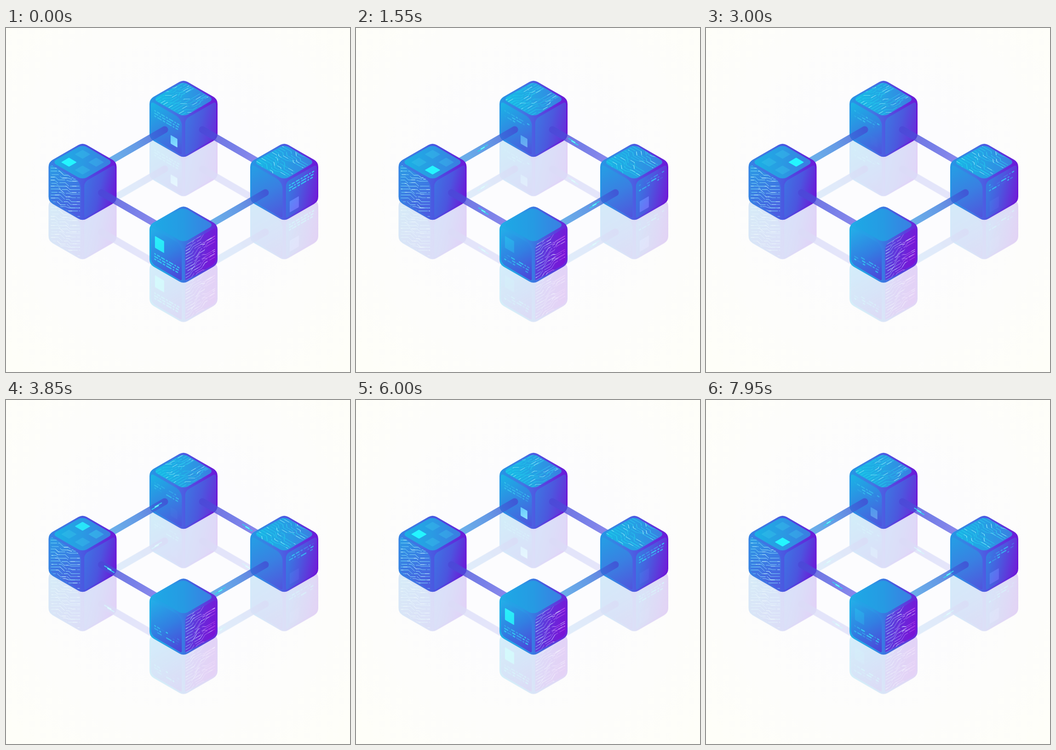
These frames come from a looping animation (748 px wide and 748 px high, 8 s). An HTML page with a canvas:

```html
<!DOCTYPE html>
<html lang="en">
<head>
<meta charset="utf-8">
<title>Linked blocks</title>
<style>
html, body { margin: 0; width: 100%; height: 100%; overflow: hidden; background: #fdfdfc; }
canvas { display: block; width: 100vw; height: 100vh; }
</style>
</head>
<body>
<canvas id="stage" width="748" height="748"></canvas>
<script>
const SIZE = 748, LOOP = 8000, CYCLE = 6260, PULSE = CYCLE / 2;
const HALF = 74, RISE = HALF / Math.sqrt(3), EDGE = RISE * 2;
const stage = document.getElementById('stage').getContext('2d');
const layer = document.createElement('canvas');
layer.width = layer.height = SIZE;
const g = layer.getContext('2d');

const noise = n => { const x = Math.sin(n * 127.1 + 3.7) * 43758.5453; return x - Math.floor(x); };
const clamp = x => Math.min(1, Math.max(0, x));

// Linear interpolation through [time, value] pairs
function keyed(t, keys) {
  for (let i = 1; i < keys.length; i++) {
    const [t0, v0] = keys[i - 1], [t1, v1] = keys[i];
    if (t <= t1) return v0 + (v1 - v0) * (t - t0) / (t1 - t0);
  }
  return keys[keys.length - 1][1];
}

function gradient(ctx, x0, y0, x1, y1, colors) {
  const fill = ctx.createLinearGradient(x0, y0, x1, y1);
  colors.forEach((c, i) => fill.addColorStop(i / (colors.length - 1), c));
  return fill;
}

// Each face maps a 100 x 100 square onto one side of the cube
const FACES = {
  top: [HALF, -RISE, HALF, RISE, -HALF, -RISE],
  left: [HALF, RISE, 0, EDGE, -HALF, -RISE],
  right: [HALF, -RISE, 0, EDGE, 0, 0]
};
const PANELS = {
  top: [5, 5, 90, 90, 13],
  left: [4, 3, 91, 92, [9, 17, 5, 13]],
  right: [5, 3, 91, 92, [10, 9, 13, 5]]
};

function onFace(name, draw) {
  const [a, b, c, d, x, y] = FACES[name];
  g.save();
  g.transform(a / 100, b / 100, c / 100, d / 100, x, y);
  draw();
  g.restore();
}

function panel(name, colors, detail) {
  onFace(name, () => {
    g.beginPath();
    g.roundRect(...PANELS[name]);
    g.fillStyle = name === 'right' ? gradient(g, 0, 30, 100, 60, colors) : gradient(g, 5, 5, 95, 95, colors);
    g.fill();
    if (detail) { g.clip(); detail(); }
  });
}

function hull(colors) {
  const pts = [[0, -EDGE], [HALF, -RISE], [HALF, RISE], [0, EDGE], [-HALF, RISE], [-HALF, -RISE]];
  g.beginPath();
  g.moveTo(HALF / 2, -EDGE + RISE / 2);
  for (let i = 1; i <= 6; i++) g.arcTo(...pts[i % 6], ...pts[(i + 1) % 6], 18);
  g.closePath();
  g.fillStyle = gradient(g, -HALF, 0, HALF, 0, colors);
  g.fill();
}

// Parallel tracks that bend together, with light running along them
function circuit(t, { flat, jog, along = 'u', colors, seed }) {
  const put = (u, v, cmd) => along === 'u' ? g[cmd](u, v) : g[cmd](v, u);
  g.lineJoin = 'round';
  for (let i = -8; i < 26; i++) {
    let u = 7 + (i % 3 === 0 ? 5 * noise(i + seed) : 0), v = i * 7.6 + 4;
    g.beginPath();
    put(u, v, 'moveTo');
    const wave = Math.sin(i * .75 + seed);
    const steps = [[20 + 9 * wave, flat], [11 + 3 * wave, jog], [17 - 6 * wave, flat],
      [9 - 2 * wave, i % 5 < 3 ? jog : -jog * .6], [40, flat]];
    for (const [du, slope] of steps) {
      const end = Math.min(92, u + du);
      v += (end - u) * slope;
      u = end;
      put(u, v, 'lineTo');
    }
    g.strokeStyle = gradient(g, 5, 0, 95, 0, colors);
    g.lineWidth = 1.25;
    g.globalAlpha = .8;
    g.setLineDash([24 + 40 * noise(i * 3 + seed), 5]);
    g.lineDashOffset = 20 * noise(i + 50);
    g.stroke();
    g.strokeStyle = '#d8fbff';
    g.globalAlpha = .6;
    g.setLineDash([13, 57]);
    g.lineDashOffset = 70 * (noise(i + seed) - t / PULSE);
    g.stroke();
  }
}

const ROWS = [[5, 9, 11, 6, 13, 5, 7], [12, 5, 10, 15, 6, 9], [6, 13, 7, 16, 5, 8]];
const TEXT_LEVEL = [[0, 1], [350, .9], [940, .3], [1550, .42], [3000, .42], [4600, .35], [6000, .72], [CYCLE, 1]];

function dashes(t, top, color, seed) {
  const level = keyed(t, TEXT_LEVEL);
  g.fillStyle = color;
  ROWS.forEach((row, r) => {
    let u = 14;
    row.forEach((w, i) => {
      const phase = noise(r * 9 + i + seed) + t / PULSE * 2;
      const swing = Math.sin(phase * Math.PI * 2) * .55 * Math.min(1, (1 - level) * 2);
      g.globalAlpha = clamp(level + swing) * .85;
      g.beginPath();
      g.roundRect(u, top + r * 6.8, w, 3.2, 1);
      g.fill();
      u += w + 3;
    });
  });
}

function square(x, y, w, h, alpha, colors) {
  g.globalAlpha = alpha;
  g.fillStyle = gradient(g, x, y, x + w, y + h, colors);
  g.beginPath();
  g.roundRect(x, y, w, h, 1.5);
  g.fill();
}

// Tile positions with the times at which each lights up and goes out
const TILES = [[30, 30, 4500, 6960], [30, 70, 700, 2250], [70, 70, 2250, 3750], [70, 30, 3750, 4650]];

function tiles(t) {
  for (const [u, v, on, off] of TILES) {
    const time = t < on - 200 ? t + CYCLE : t;
    const lit = clamp((time - on + 150) / 300) * clamp((off + 150 - time) / 300);
    g.globalAlpha = .3 + .7 * lit;
    g.fillStyle = `rgb(${60 - 24 * lit},${205 + 40 * lit},${235 + 20 * lit})`;
    g.beginPath();
    g.roundRect(u - 11.5, v - 11.5, 23, 23, 1.5);
    g.fill();
  }
}

const RIM = ['#2497e5', '#4277e4', '#5842df', '#6d16d8'];
const CYAN = ['#27dcf0', '#22cdec', '#39d8f2'];
const CUBES = {
  back: {
    x: 386, y: 197.5, rim: RIM,
    top: ['#15bfe5', '#25a2e4', '#3b7be2'],
    left: ['#18b5e5', '#3285e2', '#5052dd'],
    right: ['#3f73e1', '#4c58de', '#6530da'],
    onTop: t => circuit(t, { flat: 0, jog: .95, colors: CYAN, seed: 2 }),
    onLeft(t) {
      dashes(t, 20, '#38c6ee', 4);
      square(62, 60, 20, 22, keyed(t, [[0, 1], [350, 1], [940, 0], [1300, .85], [1550, .6], [2050, 0],
        [4500, .05], [5100, 1], [CYCLE, 1]]), ['#62c8fb', '#8fe2ff']);
    }
  },
  west: {
    x: 166.5, y: 334.5, rim: ['#3584e4', '#4270e3', '#5243df', '#6b18d8'],
    top: ['#19b3e4', '#2a9ae3', '#3d78e2'],
    left: ['#2b9ee5', '#3d78e3', '#4f57df'],
    right: ['#4070e2', '#4c55df', '#681fd8'],
    onTop: tiles,
    onLeft: t => circuit(t, { flat: -.5, jog: .32, colors: ['#6ed7f5', '#9beafa', '#72c9f7'], seed: 1 })
  },
  east: {
    x: 605, y: 334.5, rim: RIM,
    top: ['#18b8e5', '#269fe4', '#3c7ce2'],
    left: ['#249fe4', '#3980e2', '#5153dc'],
    right: ['#347fe2', '#4d55de', '#6c22d8'],
    onTop: t => circuit(t, { flat: 0, jog: -.85, along: 'v', colors: CYAN, seed: 5 }),
    onRight(t) {
      dashes(t, 15, '#32d9f5', 17);
      square(16, 58, 27, 28, keyed(t, [[0, .9], [300, 1], [1450, 1], [1800, .4], [3000, .15], [3900, .2],
        [4500, 1], [5000, 1], [5700, .15], [6000, .15], [CYCLE, .9]]), ['#5f8cfb', '#7373fa']);
    }
  },
  front: {
    x: 386, y: 471, rim: ['#1fade7', '#2999e5', '#4a59df', '#6c22da'],
    top: ['#1da9e5', '#269ae3', '#3d7ce3'],
    left: ['#22afe8', '#327fe2', '#503fd8'],
    right: ['#5351df', '#672bda', '#7b12d6'],
    onLeft(t) {
      square(16, 20, 27, 30, keyed(t, [[0, 1], [950, 1], [1550, .26], [2100, 0], [3900, 0], [4600, .8],
        [5000, 1], [CYCLE, 1]]), ['#2cf0fa', '#27e6f7']);
      dashes(t, 64, '#32dbf3', 31);
    },
    onRight: t => circuit(t, { flat: 0, jog: -.9, colors: ['#91d7fa', '#b89cf6', '#cb4aed'], seed: 3 })
  }
};

function cube({ x, y, rim, top, left, right, onTop, onLeft, onRight }, t) {
  g.save();
  g.translate(x, y);
  hull(rim);
  panel('top', top, onTop && (() => onTop(t)));
  panel('left', left, onLeft && (() => onLeft(t)));
  panel('right', right, onRight && (() => onRight(t)));
  g.restore();
}

// A bar leaving a cube to the given side; inward pulses run towards that cube
function link({ x, y }, side, inward, t) {
  const tan = RISE / HALF, x0 = x + side * 41, y0 = y + 23.5;
  const far = side < 0 ? 'rgba(60,155,227,.75)' : 'rgba(102,98,229,.75)';
  const near = side < 0 ? 'rgba(66,80,212,.82)' : 'rgba(74,72,214,.78)';
  const mid = side < 0 ? 'rgba(52,124,222,.76)' : 'rgba(74,86,224,.76)';
  g.lineCap = 'round';
  g.lineWidth = 15;
  g.strokeStyle = gradient(g, x0, y0, x0 + side * 125, y0 + 125 * tan, [near, mid, far]);
  g.beginPath();
  g.moveTo(x0, y0);
  g.lineTo(x0 + side * 128, y0 + 128 * tan);
  g.stroke();

  const phase = t % PULSE;
  const run = .063 * (phase - 940);
  const d = inward ? 84 - run : 31 + run;
  g.save();
  g.globalAlpha = clamp((phase - 350) / 250) * clamp((2300 - phase) / 250);
  for (const [shift, half, color] of [[-1.1, 7, '#35cdf0'], [1.1, 7, '#2dd5ee'], [0, 3.5, '#78f1fa']]) {
    const at = d + shift * 3;
    g.strokeStyle = color;
    g.lineWidth = 2;
    g.beginPath();
    g.moveTo(x0 + side * (at - half), y0 + (at - half) * tan + shift);
    g.lineTo(x0 + side * (at + half), y0 + (at + half) * tan + shift);
    g.stroke();
  }
  g.restore();
}

function render(t) {
  const { back, west, east, front } = CUBES;
  g.clearRect(0, 0, SIZE, SIZE);
  cube(back, t);
  link(back, -1, false, t);
  link(back, 1, true, t);
  cube(west, t);
  cube(east, t);
  link(west, 1, false, t);
  link(east, -1, true, t);
  cube(front, t);

  const glow = stage.createRadialGradient(374, 350, 180, 374, 350, 530);
  glow.addColorStop(0, '#fcfcfe');
  glow.addColorStop(1, '#fefef8');
  stage.fillStyle = glow;
  stage.fillRect(0, 0, SIZE, SIZE);
  stage.globalAlpha = .18;
  stage.drawImage(layer, 0, EDGE);
  stage.globalAlpha = 1;
  stage.drawImage(layer, 0, 0);
}

const start = performance.now();
function frame() {
  render((performance.now() - start) % LOOP % CYCLE);
  requestAnimationFrame(frame);
}
frame();
</script>
</body>
</html>
```
